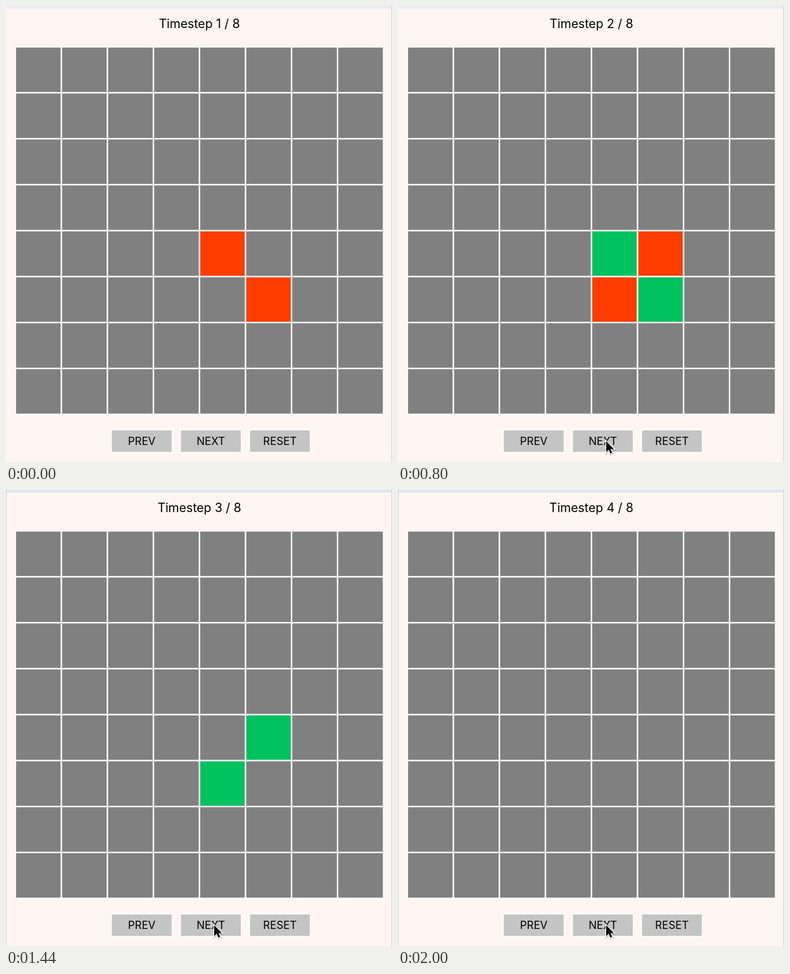
Recreate the animation shown at these times as an HTML page. Size 610 by 722 pixels, loop 2640 ms.

```html
<!DOCTYPE html>
<html lang="en">
<head>
<meta charset="utf-8">
<title>Timestep grid</title>
<style>
  html, body { margin: 0; width: 100%; height: 100%; overflow: hidden; background: #fff6f4; }
  svg { display: block; width: 610px; height: 722px; }
  text { font-family: Inter, sans-serif; font-size: 16.97px; text-anchor: middle; fill: #000; }
  .title text { font-size: 19.4px; visibility: hidden; }
  .cell { fill: #808080; }
  .button { fill: #c4c4c4; stroke: #fff; stroke-width: 2.4px; paint-order: stroke; }

  .title text, .cell, .cursor, .top, .left { animation: 2640ms step-end infinite; }
  .title .step1 { animation-name: step1; }
  .title .step2 { animation-name: step2; }
  .title .step3 { animation-name: step3; }
  .title .step4 { animation-name: step4; }
  .cell.early { animation-name: early; }
  .cell.late { animation-name: late; }
  .cursor { animation-name: point; }
  .top { animation-name: top; }
  .left { animation-name: left; }

  @keyframes step1 { 0% { visibility: visible } 30.3%, 100% { visibility: hidden } }
  @keyframes step2 { 0% { visibility: hidden } 30.3% { visibility: visible } 54.54%, 100% { visibility: hidden } }
  @keyframes step3 { 0% { visibility: hidden } 54.54% { visibility: visible } 75.75%, 100% { visibility: hidden } }
  @keyframes step4 { 0% { visibility: hidden } 75.75%, 100% { visibility: visible } }
  @keyframes early { 0% { fill: #ff3d00 } 30.3% { fill: #00c25e } 54.54%, 100% { fill: #808080 } }
  @keyframes late {
    0% { fill: #808080 } 30.3% { fill: #ff3d00 }
    54.54% { fill: #00c25e } 75.75%, 100% { fill: #808080 }
  }
  @keyframes point {
    0% { visibility: hidden; transform: translate(345px, 699px) }
    9.09% { visibility: visible; transform: translate(345px, 699px) }
    18.18%, 100% { visibility: visible; transform: translate(329px, 689px) }
  }
  @keyframes top { 0% { fill: #e9ebf6 } 33.33%, 100% { fill: #e1e5f0 } }
  @keyframes left { 0% { height: 0 } 33.33% { height: 234px } 54.54%, 100% { height: 722px } }
</style>
</head>
<body>
<svg viewBox="0 0 610 722">
  <rect width="610" height="722" fill="#fff6f4"/>
  <rect class="top" width="610" height="4"/>
  <rect class="left" width="1" height="0" fill="#d2cfd3"/>
  <rect x="609" width="1" height="722" fill="#d2cfd3"/>
  <g class="title"></g>
  <rect x="14.6" y="64.5" width="582.3" height="582.2" fill="#fff"/>
  <g class="grid"></g>
  <g class="buttons"></g>
  <g class="cursor">
    <path d="M0 0V17.2L3.9 13.5L6.5 19.6L9.4 18.4L6.9 12.4H12.2Z" stroke="#0003" stroke-width="3" transform="translate(.3 1.2)"/>
    <path d="M0 0V17.2L3.9 13.5L6.5 19.6L9.4 18.4L6.9 12.4H12.2Z" stroke="#fff" stroke-width="2.4" paint-order="stroke"/>
  </g>
</svg>
<script>
  const add = (group, name, attributes, label = '') => {
    const node = document.createElementNS('http://www.w3.org/2000/svg', name);
    for (const key in attributes) node.setAttribute(key, attributes[key]);
    node.textContent = label;
    document.querySelector(group).append(node);
  };

  for (let step = 1; step <= 4; step++) {
    add('.title', 'text', { class: `step${step}`, x: 305.6, y: 35.2 }, `Timestep ${step} / 8`);
  }

  const pitch = 72.75;
  const active = { '4,4': 'early', '5,5': 'early', '5,4': 'late', '4,5': 'late' };
  for (let row = 0; row < 8; row++) {
    for (let col = 0; col < 8; col++) {
      add('.grid', 'rect', {
        class: `cell ${active[`${col},${row}`] || ''}`,
        x: 15.9 + col * pitch, y: 65.8 + row * pitch, width: 70.4, height: 70.4
      });
    }
  }

  ['PREV', 'NEXT', 'RESET'].forEach((label, i) => {
    const x = 214.5 + i * 109.2;
    add('.buttons', 'rect', { class: 'button', x: x - 47.3, y: 672, width: 94.6, height: 34 });
    add('.buttons', 'text', { x, y: 695.1 }, label);
  });
</script>
</body>
</html>
```
